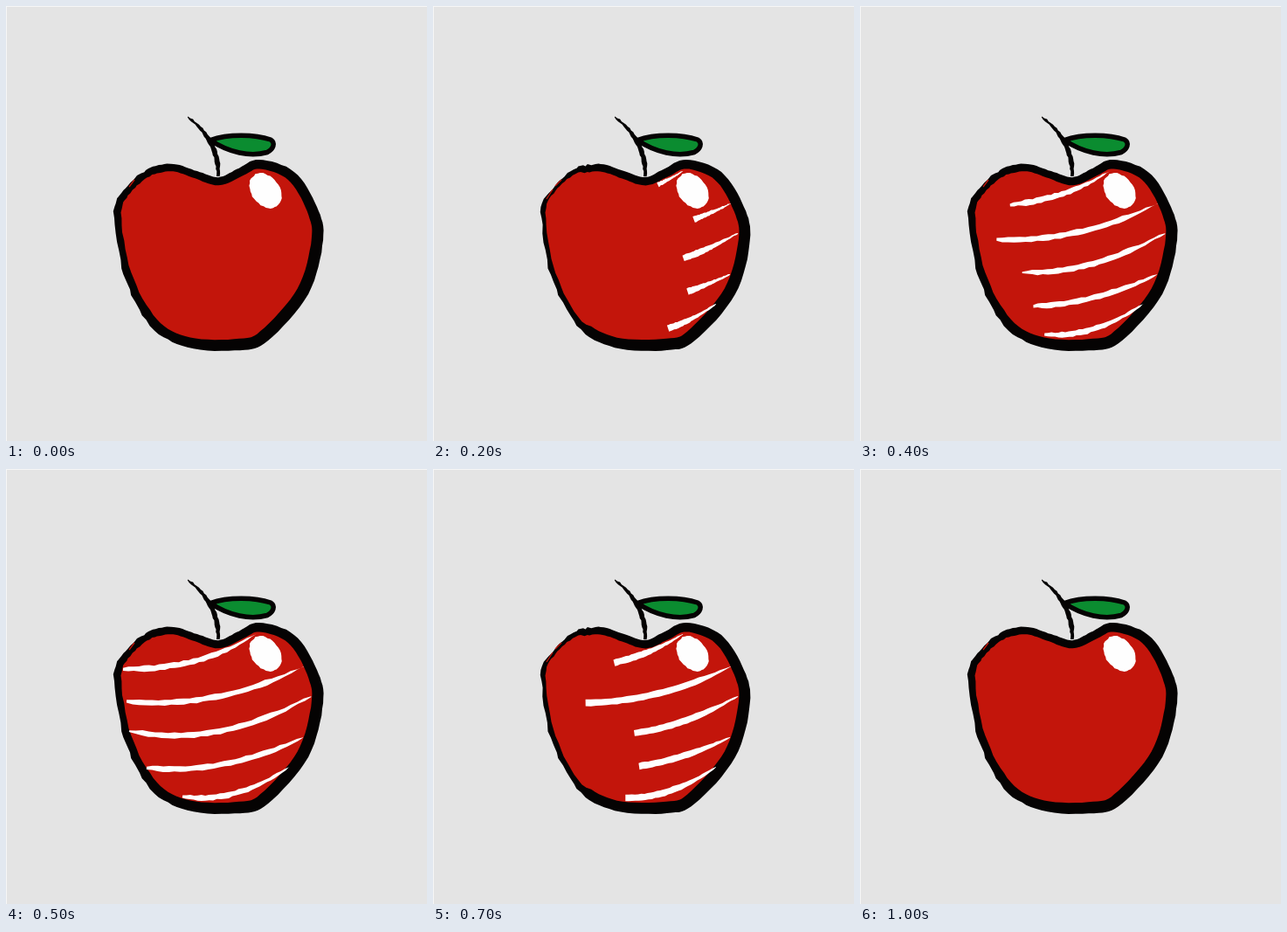
Write an HTML page that moves like this. It is 482 px wide and 498 px high and loops after 1.1 s.

```html
<!DOCTYPE html>
<html lang="en">
<head>
<meta charset="utf-8">
<title>Striped apple</title>
<style>
  html, body { margin: 0; width: 100%; height: 100%; overflow: hidden; background: #f6f6f6; }
  svg { display: block; width: 482px; height: 498px; }
</style>
</head>
<body>
<svg viewBox="0 0 482 498">
  <rect x="1" y="1" width="481" height="497" fill="#e4e4e4"/>
  <path id="skin" fill="#050303"/>
  <path id="flesh" fill="#c3150b"/>
  <path id="fleck" fill="none" stroke="#c3150b" stroke-width="1.3"/>
  <g id="stripes" fill="#fefefe"></g>
  <path id="shine" fill="#fefefe"/>
  <path d="M234 153.5C255 146 285 147 303 153C309 157 306 164 299 167.5C280 173 255 168 234 153.5Z"
    fill="#0b8c30" stroke="#050303" stroke-width="5.5" stroke-linejoin="round"/>
  <path id="stem" fill="#050303"/>
</svg>
<script>
const $ = id => document.getElementById(id);

const outline = [[124,236],[139,206],[164,186],[192,181],[219,189],[243,196],[264,187],[290,176],
  [330,190],[356,230],[363,268],[346,330],[300,383],[268,394],[208,391],[165,366],[135,308]];

// Each stripe is a quadratic curve; grown holds its length in the two middle stages.
const stripes = [
  { curve: [[286,189],[220,231],[134,229]], grown: [0.21, 0.55] },
  { curve: [[341,226],[240,276],[138,266]], grown: [0.21, 0.82] },
  { curve: [[349,260],[245,320],[141,300]], grown: [0.30, 0.57] },
  { curve: [[340,307],[250,351],[161,342]], grown: [0.27, 0.58] },
  { curve: [[324,341],[263,384],[202,375]], grown: [0.45, 0.85] }
];

function random(seed) {
  return () => {
    seed = (seed * 16807) % 2147483647;
    return seed / 2147483647;
  };
}

function draw(points) {
  return "M" + points.map(([x, y]) => x.toFixed(1) + " " + y.toFixed(1)).join("L") + "Z";
}

// Smooth closed curve through the points.
function loop(points, sub = 8) {
  const n = points.length;
  const mix = (a, b, c, d, t) => {
    const cubic = 3 * (b - c) + d - a;
    const square = 2 * a - 5 * b + 4 * c - d;
    return b + 0.5 * t * (c - a + t * (square + t * cubic));
  };
  return Array.from({ length: n * sub }, (_, k) => {
    const i = Math.floor(k / sub), t = (k % sub) / sub;
    const [a, b, c, d] = [-1, 0, 1, 2].map(o => points[(i + o + n) % n]);
    return [mix(a[0], b[0], c[0], d[0], t), mix(a[1], b[1], c[1], d[1], t)];
  });
}

function bezier([a, b, c], end = 1, steps = 28) {
  return Array.from({ length: steps + 1 }, (_, i) => {
    const t = end * i / steps, s = 1 - t;
    return [0, 1].map(j => s * s * a[j] + 2 * s * t * b[j] + t * t * c[j]);
  });
}

function normal(a, b) {
  const dx = b[0] - a[0], dy = b[1] - a[1], len = Math.hypot(dx, dy);
  return [-dy / len, dx / len];
}

// Dry-brush edge: shifts every point by up to half of rough(x).
function jitter(points, rough, seed) {
  const r = random(seed);
  return points.map(([x, y]) => [x + (r() - 0.5) * rough(x), y + (r() - 0.5) * rough(x)]);
}

// The brush line is thickest at the lower right; thin narrows the left side.
function inset(points, thin) {
  const n = points.length;
  return points.map((p, i) => {
    const [nx, ny] = normal(points[(i + n - 1) % n], points[(i + 1) % n]);
    const angle = Math.atan2(p[1] - 286, p[0] - 243);
    const w = 11 + 3 * Math.cos(angle - 0.6) - (p[0] < 170 ? thin : 0);
    return [p[0] + nx * w, p[1] + ny * w];
  });
}

function ribbon(points, width, rough, seed) {
  const r = random(seed), left = [], right = [], last = points.length - 1;
  points.forEach((p, i) => {
    const [nx, ny] = normal(points[Math.max(0, i - 1)], points[Math.min(last, i + 1)]);
    const w = width(p, i / last) / 2;
    const u = w + (r() - 0.5) * rough, v = w + (r() - 0.5) * rough;
    left.push([p[0] + nx * u, p[1] + ny * u]);
    right.unshift([p[0] - nx * v, p[1] - ny * v]);
  });
  return draw(left.concat(right));
}

function stripe({ curve, grown: [short, long] }, stage, seed) {
  const length = [0, short / 2, short, long, (1 + long) / 2, 1][stage];
  if (!length) return "";
  const full = stage > 3, tip = curve[0][0];
  const points = bezier(curve, length), end = points[points.length - 1][0];
  const width = ([x]) => {
    const grow = Math.min(1, 0.14 + (tip - x) / 52);
    const fade = full ? Math.min(1, 0.45 + (x - end) / 30) : 1;
    return (full ? 6.3 : 7.4) * grow * fade;
  };
  return ribbon(points, width, full ? 1.5 : 0.8, seed);
}

const edge = loop(outline);
const looks = [0, 3].map((thin, i) => ({
  skin: draw(jitter(edge, x => x < 190 ? 2.4 : 0.5, 31 + i * 18)),
  flesh: draw(jitter(inset(edge, thin), x => x < 180 ? 1.2 : 0.4, 5 + i)),
  fleck: i ? "M130 221L137 210M140 206L147 199" : "M141 207L147 199"
}));

const tilt = 53 * Math.PI / 180;
const shine = Array.from({ length: 40 }, (_, i) => {
  const a = i * Math.PI / 20, u = 22 * Math.cos(a), v = 16 * Math.sin(a);
  return [297 + u * Math.cos(tilt) - v * Math.sin(tilt), 211.5 + u * Math.sin(tilt) + v * Math.cos(tilt)];
});
$("shine").setAttribute("d", draw(jitter(shine, () => 1.3, 7)));

const stemWidth = (p, t) => 2 + Math.min(1, t * 2.5) * 3.2 - (t > 0.85 ? 1 : 0);
$("stem").setAttribute("d", ribbon(bezier([[208,127],[244,154],[243,195]]), stemWidth, 1.2, 9));

const strokes = stripes.map(() =>
  $("stripes").appendChild(document.createElementNS("http://www.w3.org/2000/svg", "path")));

let shown = -1;
function show(step) {
  if (step === shown) return;
  shown = step;
  // Grows to full length at step 5, then shrinks back.
  const stage = 5 - Math.abs(5 - step);
  const look = looks[stage === 2 || stage === 3 ? 1 : 0];
  for (const id in look) $(id).setAttribute("d", look[id]);
  strokes.forEach((path, k) => path.setAttribute("d", stripe(stripes[k], stage, 11 + k * 13)));
}

const start = performance.now();
function tick() {
  show(Math.floor(((performance.now() - start) % 1100) / 100));
  requestAnimationFrame(tick);
}
tick();
</script>
</body>
</html>
```
